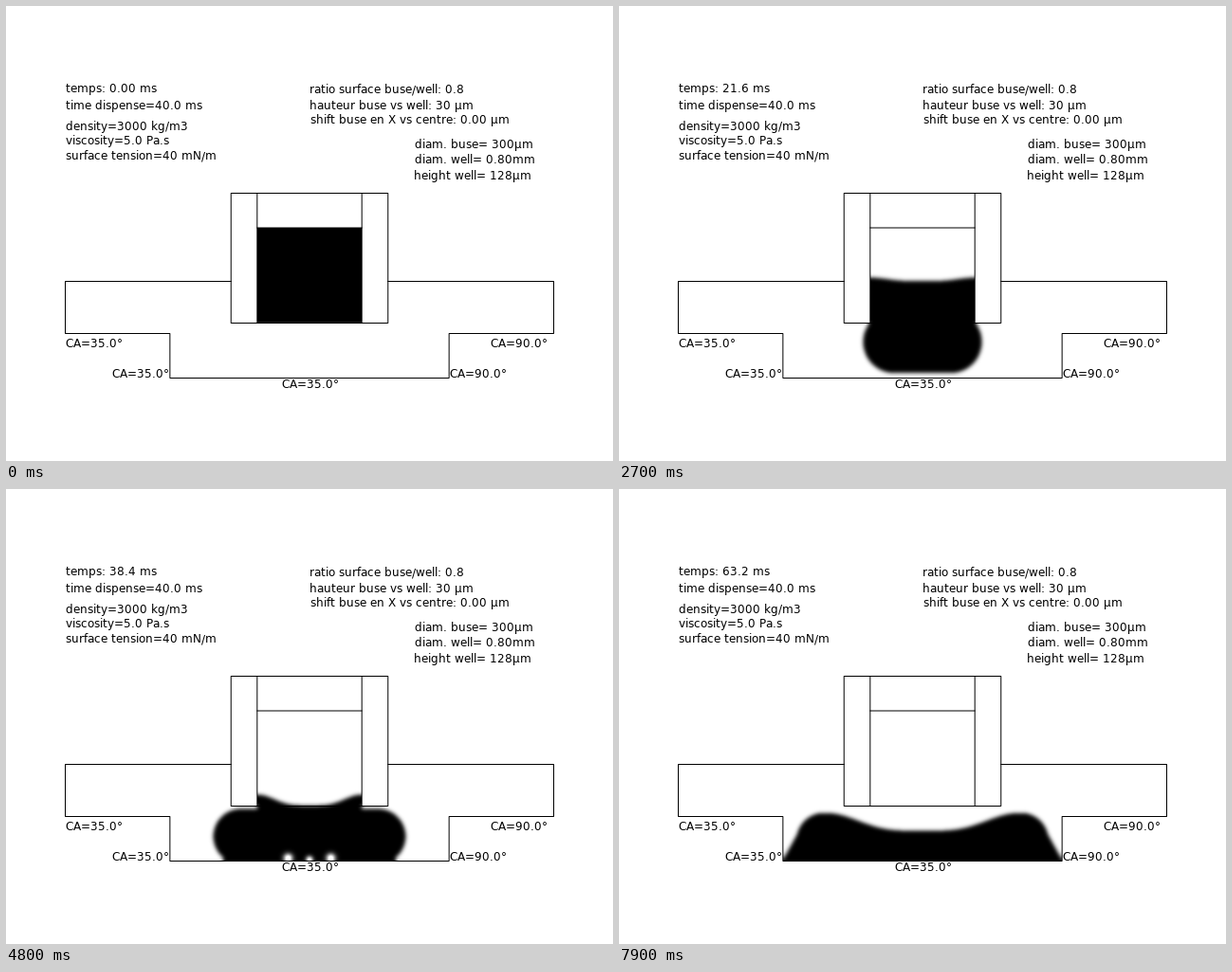
Animation, 640 px wide and 480 px high, one loop 8000 ms. Source, as a matplotlib script:

```python
import numpy as np
import matplotlib.pyplot as plt
from matplotlib.animation import FuncAnimation
from matplotlib.textpath import TextPath

W, H, DPI = 640, 480, 100
FRAMES, STEP = 80, 100
PX = 72 / DPI
FONT = 12                      # pixels
CX = 320                       # symmetry axis

# Geometry: half widths in micrometres, scaled to pixels
SCALE = 257.5 / 700
BORE, NOZZLE, WELL, PLATE = (SCALE * v for v in (150, 225, 400, 700))
FILL, TIP, LEDGE, FLOOR, HALF = 234, 334, 345, 392, 147

plt.rcParams.update({
    "font.family": "DejaVu Sans",
    "font.size": FONT * PX,
    "text.hinting": "force_autohint",
})

# Half-pixel grid over the right half of the liquid's domain
gu = np.arange(0.25, HALF, 0.5)
gy = np.arange(FILL + 0.25, FLOOR, 0.5)
U, Y = np.meshgrid(gu, gy)
OPEN = ((U < BORE) | (Y > TIP) | ((U > NOZZLE) & (Y > 290))).astype(float)


def shape(t):
    """Mask of the liquid t seconds into the loop."""
    # Rounded bar that leaves the nozzle, lands and spreads
    reach = BORE + 18.5 * np.clip(t - 2.3, 0, 4.2)
    r = np.interp(t, [0, 1.75, 3.4, 4.8, 6.5, 8], [0, 42, 26, 29, 31, 29])
    bottom = np.interp(t, [0, 1, 1.9, 2.5, 3.6, 4.8, 8],
                       [334, 360, 380.5, 387, 388, 395.5, 400])
    mid = bottom - r
    bar = np.hypot(np.maximum(U - reach + r, 0), Y - mid) < r

    # Contact line creeping along the floor to the well's wall
    foot = np.interp(t, [3, 4.8, 6.5, 7.9], [0, 91, 130, 147.5])
    lean = np.interp(t, [6.5, 7.9], [0, 0.55])
    wedge = ((U < foot - lean * (FLOOR - Y)) & (Y < bottom)
             & (Y > mid - lean * r))

    # Free surface: steady descent while dispensing, then settling
    low = FILL + 20.8 * min(t, 5)
    low += 23 * (1 - np.exp(-max(t - 5, 0) / 0.75))
    rise = 0.5 * t**2 if t < 4.8 else np.interp(t, [4.8, 6.5, 8], [11.5, 20.5, 18.5])
    span = np.interp(t, [4.8, 6.5], [BORE, 101])
    s = (1 - np.cos(np.pi * np.minimum(U / span, 1))) / 2
    column = (U < BORE) & (Y < mid)
    return (Y > low - rise * s**2) & (bar | wedge | column)


def kernel(v, sigma):
    return np.exp(-0.5 * ((v[:, None] - v) / sigma) ** 2)


def blur(mask, sigma):
    """Gaussian blur that does not leak through the walls."""
    ky, kx = kernel(gy, sigma), kernel(gu, sigma)
    return OPEN * (ky @ (mask * OPEN) @ kx) / (ky @ OPEN @ kx + 1e-9)


def bubble(t, u, y, size, times, amounts):
    size *= np.interp(t, [4.8, 6.5], [1, 1.8])
    spot = np.exp(-((U - u) ** 2 + (Y - y) ** 2) / size**2)
    return 1 - np.clip(np.interp(t, times, amounts) * spot, 0, 1)


def liquid(t):
    field = blur(shape(t), np.interp(t, [0, 0.6], [0.4, 2.1]))
    field *= bubble(t, 22.5, 389.5, 5, [3.7, 4.3, 4.8, 6, 7.5], [0, 1.15, 1.15, 0.2, 0])
    field *= bubble(t, 0, 391, 4, [3.7, 4.3, 4.8, 5.4], [0, 1, 1, 0])
    h, w = field.shape
    half = field.reshape(h // 2, 2, w // 2, 2).mean(axis=(1, 3))
    return 1 - np.hstack([half[:, ::-1], half])


def right_edge(s):
    return TextPath((0, 0), s, size=FONT).get_extents().x1


ADVANCE = {}


def advance(c):
    """Glyph advance rounded to whole pixels."""
    if c not in ADVANCE:
        ADVANCE[c] = round(right_edge(c + "|") - right_edge("|"))
    return ADVANCE[c]


fig = plt.figure(figsize=(W / 100, H / 100), dpi=DPI, facecolor="white")
ax = fig.add_axes([0, 0, 1, 1])
ax.axis("off")
picture = ax.imshow(liquid(0), cmap="gray", vmin=0, vmax=1, aspect="auto",
                    interpolation="nearest", zorder=1,
                    extent=(CX - HALF, CX + HALF, FLOOR, FILL))
ax.set_xlim(0, W)
ax.set_ylim(H, 0)


def line(*pts):
    x, y = zip(*pts)
    ax.plot([CX + v for v in x], y, color="black", lw=PX, snap=False,
            solid_capstyle="projecting", solid_joinstyle="miter", zorder=2)


def write(x, y, s):
    """Set text on whole pixels, glyph by glyph."""
    glyphs = []
    for c in s:
        if c != " ":
            # the offset makes the side bearing round down
            glyphs.append(ax.text(x - 0.45, y, c, va="baseline", zorder=3))
        x += advance(c)
    return glyphs


for k in (-1, 1):
    line((k * NOZZLE, 290.5), (k * PLATE, 290.5), (k * PLATE, LEDGE + 0.5),
         (k * WELL, LEDGE + 0.5), (k * WELL, FLOOR + 0.5), (0, FLOOR + 0.5))
    line((0, 197.5), (k * NOZZLE, 197.5), (k * NOZZLE, TIP + 0.5), (0, TIP + 0.5))
    line((k * BORE, 197.5), (k * BORE, TIP + 0.5))
line((-BORE, FILL), (BORE, FILL))

for x, y, s in [
    (63, 91, "temps:"),
    (63, 109, "time dispense=40.0 ms"),
    (63, 131, "density=3000 kg/m3"),
    (63, 146, "viscosity=5.0 Pa.s"),
    (63, 162, "surface tension=40 mN/m"),
    (320, 92, "ratio surface buse/well: 0.8"),
    (320, 109, "hauteur buse vs well: 30 µm"),
    (321, 124, "shift buse en X vs centre: 0.00 µm"),
    (431, 150, "diam. buse= 300µm"),
    (431, 166, "diam. well= 0.80mm"),
    (430, 183, "height well= 128µm"),
    (63, 360, "CA=35.0°"),
    (112, 392, "CA=35.0°"),
    (291, 403, "CA=35.0°"),
    (468, 392, "CA=90.0°"),
    (511, 360, "CA=90.0°"),
]:
    write(x, y, s)

clock = []


def update(i):
    t = i * STEP / 1000
    picture.set_data(liquid(t))
    for glyph in clock:
        glyph.remove()
    ms = 8 * t
    clock[:] = write(109, 91, f"{ms:.{2 if ms < 10 else 1}f} ms")
    return [picture, *clock]


anim = FuncAnimation(fig, update, frames=FRAMES, interval=STEP, repeat=True,
                     repeat_delay=0, blit=False)
plt.show()
```
